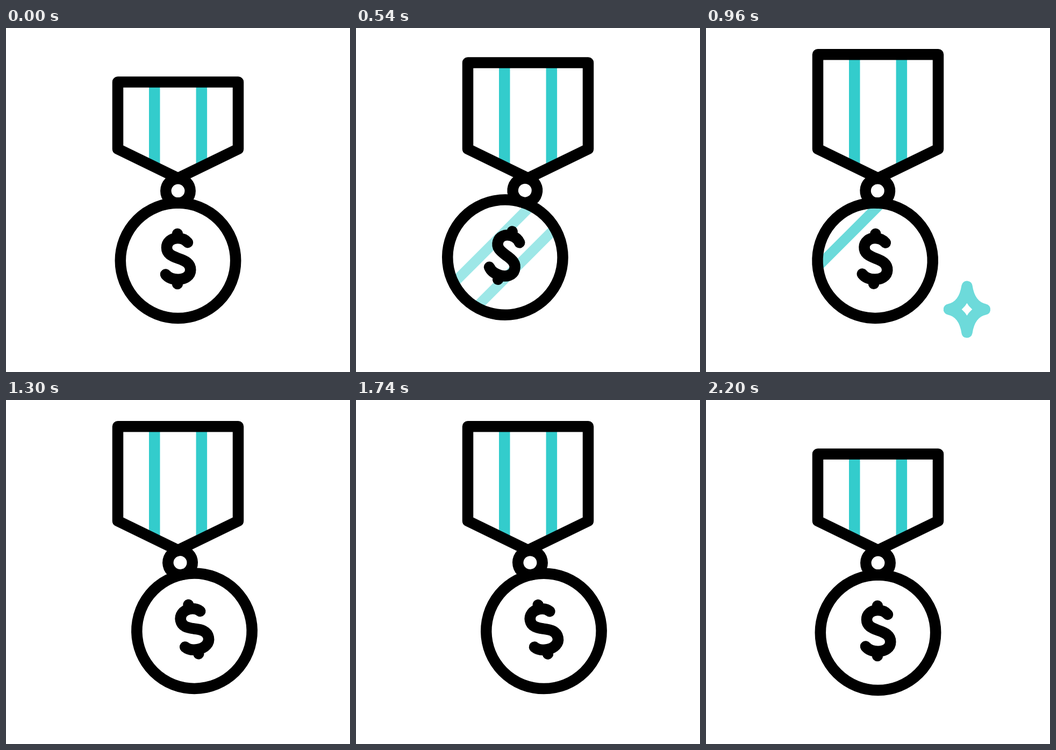
An HTML page with a canvas that plays this animation: 640x640 px, repeating every 3400 ms.

```html
<!DOCTYPE html>
<html lang="en">
<head>
<meta charset="utf-8">
<title>Medal</title>
<style>
  html, body { margin: 0; width: 100%; height: 100%; overflow: hidden; background: #fff; }
  canvas { display: block; width: 100vw; height: 100vh; }
</style>
</head>
<body>
<canvas id="stage" width="640" height="640"></canvas>
<script>
const ctx = document.getElementById('stage').getContext('2d');
const LOOP = 3400;
const TEAL = '#33cccc';
const LINE = 20.5;
const PIVOT = { x: 320, y: 283 };
const DISC = { x: 320, y: 432.8, r: 107.2 };

// Keys are [input, value] pairs.
const SWING = [[220, 0], [380, 6.9], [720, 27.2], [738, 28.2], [1208, -26.9],
  [1518, 23.6], [1818, -23.4], [2200, 0]];
const TOP = [[200, 100.5], [740, 49.2], [1820, 49.2], [2200, 100.5]];
const SHINE = [[0, -151], [2.3, -89], [6.9, -54.5], [28.2, 153]];
const SPARKS = [
  { x: 485.5, y: 523.5, start: 690, peak: 1070, end: 1290 },
  { x: 155.5, y: 340, start: 1830, peak: 2020, end: 2190 }
];

const linear = p => p;
const smooth = p => (1 - Math.cos(Math.PI * p)) / 2;

function track(keys, at, ease = linear) {
  if (at <= keys[0][0]) return keys[0][1];
  for (let i = 1; i < keys.length; i++) {
    const [a, from] = keys[i - 1];
    const [b, to] = keys[i];
    if (at <= b) return from + (to - from) * ease((at - a) / (b - a));
  }
  return keys[keys.length - 1][1];
}

function stroke(path, color = '#000') {
  ctx.strokeStyle = color;
  ctx.stroke(path);
}

function circle(x, y, r) {
  const path = new Path2D();
  path.arc(x, y, r, 0, Math.PI * 2);
  return path;
}

const dollar = new Path2D(
  'M338 399C333 393 327 391 319 391C307 391 299 399 299 408.5' +
  'C299 420 308 424 320 428.5C334 433 343.3 438 343.3 450' +
  'C343.3 461 333 467.7 320 467.7C309 467.7 301 463.5 297 458.5' +
  'M319 383V391M319 468V476');

function drawBadge(top) {
  ctx.fillStyle = TEAL;
  for (const x of [266, 353.6]) ctx.fillRect(x, top, 20.5, 252 - top);
  stroke(new Path2D(`M208 ${top}H432V225L320 279.5L208 225Z`));
}

function drawShine(angle, x, y) {
  if (angle <= 0) return;
  const lead = track(SHINE, angle);
  ctx.save();
  ctx.clip(circle(x, y, DISC.r));
  ctx.globalAlpha = 0.55 - lead * 0.0018;
  ctx.translate(x, y);
  ctx.rotate(Math.PI / 4);
  ctx.fillStyle = TEAL;
  // Offsets are sums x + y, so divide by sqrt 2 for the distance.
  for (const sum of [lead, lead - 87]) {
    ctx.fillRect(sum / Math.SQRT2 - 9.5, -130, 19, 260);
  }
  ctx.restore();
}

function drawMedal(angle) {
  const turn = angle * Math.PI / 180;
  const arm = DISC.y - PIVOT.y;
  drawShine(angle, PIVOT.x - arm * Math.sin(turn), PIVOT.y + arm * Math.cos(turn));
  ctx.save();
  ctx.translate(PIVOT.x, PIVOT.y);
  ctx.rotate(turn);
  ctx.translate(-PIVOT.x, -PIVOT.y);
  stroke(circle(320, 303, 22.7));
  stroke(circle(DISC.x, DISC.y, DISC.r));
  stroke(dollar);
  ctx.restore();
}

function drawSpark({ x, y, start, peak, end }, time) {
  if (time <= start || time >= end) return;
  const grow = track([[start, 0], [peak, 1], [end, 0]], time);
  const size = 0.52 + 0.48 * grow;
  const w = 38.8 * size;
  const h = 49.5 * size;
  const bend = 6.5 * size;
  const star = new Path2D();
  star.moveTo(x, y - h);
  star.quadraticCurveTo(x + bend, y - bend, x + w, y);
  star.quadraticCurveTo(x + bend, y + bend, x, y + h);
  star.quadraticCurveTo(x - bend, y + bend, x - w, y);
  star.quadraticCurveTo(x - bend, y - bend, x, y - h);
  star.closePath();
  ctx.globalAlpha = grow;
  stroke(star, TEAL);
  ctx.globalAlpha = 1;
}

function draw(time) {
  ctx.fillStyle = '#fff';
  ctx.fillRect(0, 0, 640, 640);
  ctx.lineWidth = LINE;
  ctx.lineCap = ctx.lineJoin = 'round';
  for (const spark of SPARKS) drawSpark(spark, time);
  drawMedal(track(SWING, time));
  drawBadge(track(TOP, time, smooth));
}

const begin = performance.now();
function tick() {
  draw((performance.now() - begin) % LOOP);
  requestAnimationFrame(tick);
}
tick();
</script>
</body>
</html>
```
